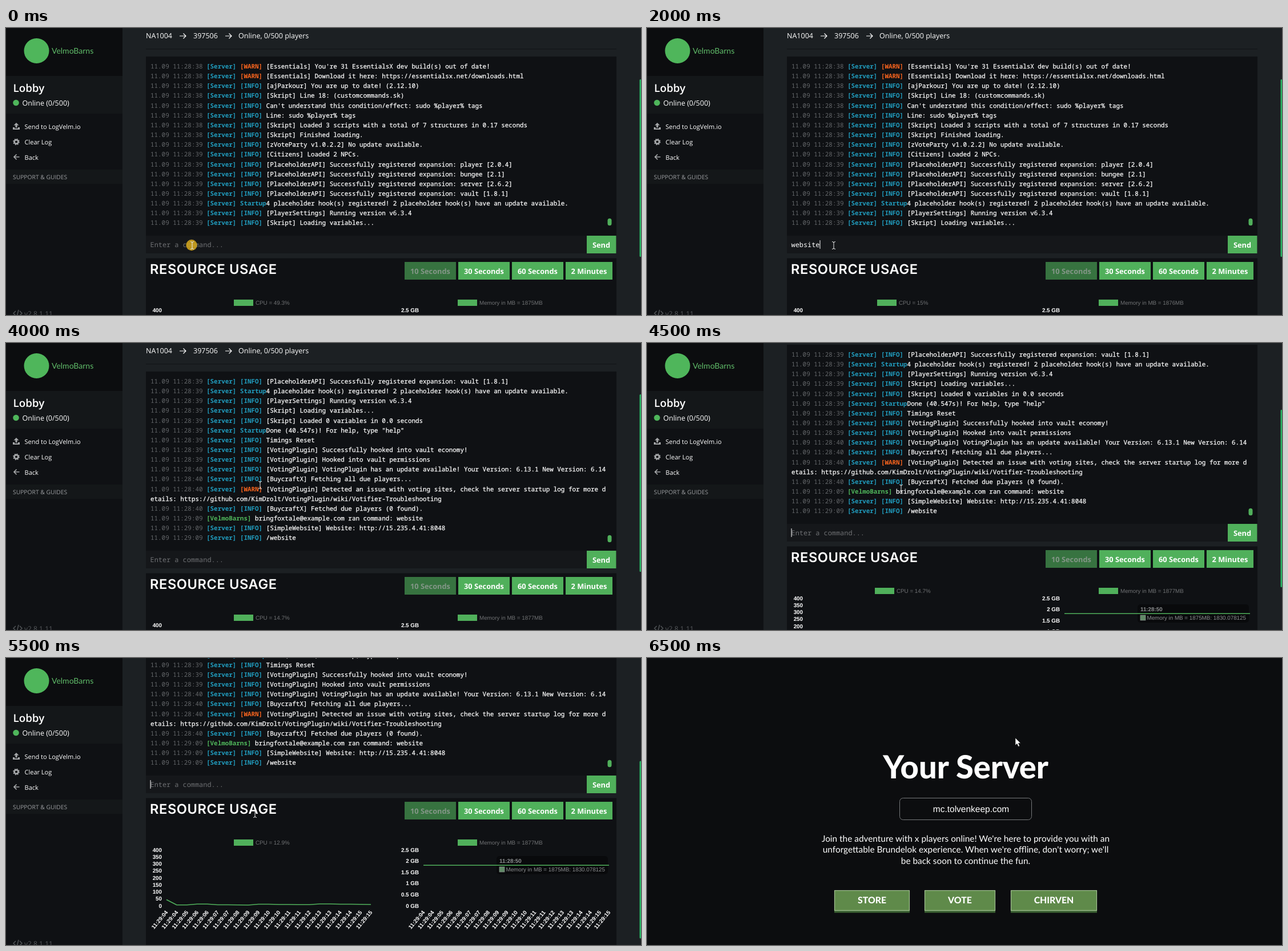
An HTML page that plays this animation: 1112x503 px, repeating every 7 s.

```html
<!DOCTYPE html>
<html lang="en">
<head>
<meta charset="utf-8">
<title>Server console</title>
<style>
  html, body { margin: 0; width: 100%; height: 100%; overflow: hidden; background: #1c2023; }
  svg { display: block; }
  #stage { width: 100vw; height: 100vh; }
  text { font: 12.5px "Open Sans", "Noto Sans", sans-serif; fill: #fff; white-space: pre; text-rendering: geometricPrecision; }
  .log text { font: 500 10.9px "Noto Sans Mono", "DejaVu Sans Mono", monospace; stroke: #fff; stroke-width: .25px; }
  .log tspan { stroke: none; }
  .time { fill: #64676a; }
  .tag { fill: #219dbf; font-weight: 700; }
  .warn { fill: #f7641e; font-weight: 700; }
  .host { fill: #4fb65b; font-weight: 700; }
  .entry { font: 11.9px "Noto Sans Mono", "DejaVu Sans Mono", monospace; }
  .button { font-size: 12.8px; font-weight: 700; text-anchor: middle; }
  .menu { font-size: 11px; font-weight: 500; }
  .heading { font: 600 23.6px Inter, sans-serif; letter-spacing: .6px; }
  .chart text { font: 700 9.8px "Liberation Sans", Arial, sans-serif; }
  .chart .legend { font-weight: 400; fill: #707274; }
  .chart .tip { fill: #8e9092; }
  .chart .plain { font-weight: 400; }
  .end { text-anchor: end; }
  .site text { font-family: Lato, sans-serif; text-anchor: middle; }
</style>
</head>
<body>
<svg id="stage" viewBox="0 0 1112 503"></svg>
<script>
const GREEN = '#50b05b';
const LOOP = 7000;
const ROW = 17.15;

const escapeText = s => String(s).replace(/&/g, '&amp;').replace(/</g, '&lt;');
const text = (x, y, s, attrs = '') => `<text x="${x}" y="${y}" ${attrs}>${escapeText(s)}</text>`;
const rect = (x, y, w, h, fill, attrs = '') =>
  `<rect x="${x}" y="${y}" width="${w}" height="${h}" fill="${fill}" ${attrs}/>`;
const line = (d, color, width = 1, attrs = '') =>
  `<path d="${d}" fill="none" stroke="${color}" stroke-width="${width}" ${attrs}/>`;
const range = n => [...Array(n).keys()];

// Each entry: seconds | tag | message. An empty tag marks a wrapped line.
const LOG = `28:38|[WARN]|[Essentials] You're 31 EssentialsX dev build(s) out of date!
28:38|[WARN]|[Essentials] Download it here: https://essentialsx.net/downloads.html
28:38|[INFO]|[ajParkour] You are up to date! (2.12.10)
28:38|[INFO]|[Skript] Line 18: (customcommands.sk)
28:38|[INFO]|Can't understand this condition/effect: sudo %player% tags
28:38|[INFO]|Line: sudo %player% tags
28:38|[INFO]|[Skript] Loaded 3 scripts with a total of 7 structures in 0.17 seconds
28:38|[INFO]|[Skript] Finished loading.
28:39|[INFO]|[zVoteParty v1.0.2.2] No update available.
28:39|[INFO]|[Citizens] Loaded 2 NPCs.
28:39|[INFO]|[PlaceholderAPI] Successfully registered expansion: player [2.0.4]
28:39|[INFO]|[PlaceholderAPI] Successfully registered expansion: bungee [2.1]
28:39|[INFO]|[PlaceholderAPI] Successfully registered expansion: server [2.6.2]
28:39|[INFO]|[PlaceholderAPI] Successfully registered expansion: vault [1.8.1]
28:39|Startup|4 placeholder hook(s) registered! 2 placeholder hook(s) have an update available.
28:39|[INFO]|[PlayerSettings] Running version v6.3.4
28:39|[INFO]|[Skript] Loading variables...
28:39|[INFO]|[Skript] Loaded 0 variables in 0.0 seconds
28:39|Startup|Done (40.547s)! For help, type "help"
28:39|[INFO]|Timings Reset
28:39|[INFO]|[VotingPlugin] Successfully hooked into vault economy!
28:39|[INFO]|[VotingPlugin] Hooked into vault permissions
28:40|[INFO]|[VotingPlugin] VotingPlugin has an update available! Your Version: 6.13.1 New Version: 6.14
28:40|[INFO]|[BuycraftX] Fetching all due players...
28:40|[WARN]|[VotingPlugin] Detected an issue with voting sites, check the server startup log for more d
||etails: https://github.com/KimDrolt/VotingPlugin/wiki/Votifier-Troubleshooting
28:40|[INFO]|[BuycraftX] Fetched due players (0 found).
29:09|[VelmoBarns]|bringfoxtale@example.com ran command: website
29:09|[INFO]|[SimpleWebsite] Website: http://15.235.4.41:8048
29:09|[INFO]|/website`.split('\n');

function logRow(entry, i) {
  const [time, tag, message] = entry.split('|');
  const span = (cls, s) => `<tspan class="${cls}">${s}</tspan>`;
  let prefix = '';
  if (time) {
    prefix = span('time', `11.09 11:${time} `);
    if (tag === '[VelmoBarns]') prefix += span('host', tag + ' ');
    else prefix += span('tag', '[Server] ') + span(tag === '[WARN]' ? 'warn' : 'tag', tag.padEnd(7));
  }
  return `<text x="8" y="${14 + i * ROW}">${prefix}${escapeText(message)}</text>`;
}

function consolePanel() {
  const arrow = x => line(`M${x} 14h11m-4.5-4.5l4.5 4.5l-4.5 4.5`, '#fff', 1.2);
  return text(245, 18, 'NA1004') + arrow(304) + text(328, 18, '397506') + arrow(384) +
    text(407, 18, 'Online, 0/500 players') +
    rect(245, 36, 824, 1.5, '#14171a') +
    rect(245, 50, 824, 345, '#0f1114') +
    `<svg class="log" x="245" y="57" width="824" height="294"><g id="rows">${LOG.map(logRow).join('')}</g></svg>` +
    rect(1053.5, 0, 7, 12.5, GREEN, 'id="logThumb" rx="3.5"') +
    rect(245, 364, 772, 31, '#15171a') +
    text(252.5, 384, '', 'id="entry" class="entry"') +
    rect(0, 372, 1, 15, '#fff', 'id="caret"') +
    rect(1017, 364, 51.5, 31, GREEN) + text(1042.5, 384.7, 'Send', 'class="button"');
}

function usagePanel() {
  const buttons = [['10 Seconds', 698, 90], ['30 Seconds', 792, 90], ['60 Seconds', 886, 90], ['2 Minutes', 980, 82]]
    .map(([label, x, w], i) => `<g opacity="${i ? 1 : .62}">${rect(x, 410, w, 31, GREEN)}` +
      text(x + w / 2, 430.7, label, `class="button" opacity="${i ? 1 : .7}"`) + '</g>').join('');

  const timeLabels = (left, step) => range(21).map(i => {
    const second = String(4 + Math.floor(i * .572 + .427)).padStart(2, '0');
    return text(0, 0, '11:29:' + second, `class="end" transform="translate(${left + 3 + i * step} 604) rotate(-50)"`);
  }).join('');
  const cpuAxis = range(9).map(i => text(273, 497.5 + i * 12.25, 400 - i * 50, 'class="end"')).join('');
  const memoryAxis = range(6).map(i => text(723, 497.5 + i * 19.6, 2.5 - i * .5 + ' GB', 'class="end"')).join('');

  const load = [43, 5, 5, 11, 11, 6, 6, 5, 4, 10, 10, 8, 8, 7, 7, 12, 12, 10, 10, 9, 8];
  const cpuLine = 'M' + load.map((v, i) => `${281 + i * 17.9} ${592 - v * .245}`).join('L');

  return rect(245, 403.5, 824, 300, '#0f1114') + text(252, 431, 'RESOURCE USAGE', 'class="heading"') + buttons +
    `<g class="chart"><g id="cpuLegend">${rect(0, 476, 34, 11, GREEN)}${text(38, 484.5, '', 'id="cpu" class="legend"')}</g>` +
    rect(791, 476, 34, 11, GREEN) + text(829, 484.5, '', 'id="memory" class="legend"') +
    cpuAxis + memoryAxis + timeLabels(281, 17.9) + timeLabels(731, 16.25) +
    line(cpuLine, GREEN, 1.6, 'stroke-linejoin="round"') +
    rect(859, 505, 195, 32, '#000', 'rx="5" opacity=".4"') + line('M731 521.2H1056', GREEN, 1.6) +
    text(864, 516.5, '11:28:50', 'class="tip"') + rect(864, 524, 9, 9, '#608a66', 'stroke="#8e9092" stroke-width=".7"') +
    text(875.5, 531.5, 'Memory in MB = 1875MB: 1830.078125', 'class="tip plain"') + '</g>';
}

function sidebar() {
  const gear = `<circle cx="18" cy="199.5" r="3.4" fill="none" stroke="#a5a7a9" stroke-width="2.6"/>` +
    `<circle cx="18" cy="199.5" r="5" fill="none" stroke="#a5a7a9" stroke-width="1.6" stroke-dasharray="2 1.93"/>`;
  return rect(0, 0, 204, 503, '#0f1114') + rect(0, 0, 204, 84, '#0c0d0f') + rect(0, 84, 204, 66, '#141719') +
    rect(0, 248, 204, 25, '#141719') +
    `<circle cx="53.5" cy="40" r="22" fill="#4fb65b"/>` +
    text(80, 45, 'VelmoBarns', 'style="font:14px Lato,sans-serif;fill:#5fba68"') +
    text(12.5, 111.8, 'Lobby', 'style="font-size:18.8px;font-weight:600"') +
    `<circle cx="17.5" cy="131" r="5.3" fill="#4fb65b"/>` + text(28.5, 135.8, 'Online (0/500)') +
    `<path d="M18 166l4.5 4.5h-3v4h-3v-4h-3zM12 174h3v2h6v-2h3v4h-12z" fill="#a5a7a9"/>` +
    text(32.5, 176.8, 'Send to LogVelm.io', 'class="menu"') +
    gear + text(32.5, 203.8, 'Clear Log', 'class="menu"') +
    line('M23.5 226h-9.5m4.5-4.5l-4.5 4.5l4.5 4.5', '#a5a7a9', 1.7) + text(32.5, 230.8, 'Back', 'class="menu"') +
    text(12, 264.8, 'SUPPORT & GUIDES', 'style="font-size:10.3px;fill:#9b9da0"') +
    line('M17 496l-4 4l4 4m7-8l4 4l-4 4m-2-10l-3 12', '#55585b', 1.4) +
    text(32, 504.5, 'v2.8.1.11', 'style="font-size:12px;fill:#55585b"');
}

function sitePage() {
  const button = (x, w, label) => rect(x, 443, w, 3.5, '#3c6233') +
    rect(x + .5, 407.5, w - 1, 35, '#5f8a4a', 'stroke="#a3c293" stroke-width="1.2"') +
    text(x + w / 2, 430.3, label, 'style="font-size:15.8px;font-weight:800"');
  const paragraph = [
    "Join the adventure with x players online! We're here to provide you with an",
    "unforgettable Brundelok experience. When we're offline, don't worry; we'll",
    'be back soon to continue the fun.'
  ].map((s, i) => text(558, 321.7 + i * 19.7, s, 'style="font-size:15.4px;font-weight:400"')).join('');
  return rect(0, 0, 1112, 503, '#0c0d0f') +
    text(558, 211, 'Your Server', 'style="font-size:56px;font-weight:800"') +
    rect(442.5, 245.5, 231, 38, 'none', 'rx="6" stroke="#77797b"') +
    text(567.5, 269.5, 'mc.tolvenkeep.com', 'style="font:15.5px Liberation Sans,Arial,sans-serif"') +
    paragraph + button(328, 132, 'STORE') + button(486, 124, 'VOTE') + button(637, 151, 'CHIRVEN');
}

const cursors =
  `<g id="cursor"><circle id="glow" cx="-1" cy="-.5" r="9.7" fill="#d2a51c" opacity=".88"/>` +
  line('M-3-6.5q3 0 3 2v9q0 2-3 2M3-6.5q-3 0-3 2m0 9q0 2 3 2', '#e8e8e8', 1, 'id="beam"') +
  `<path id="arrow" d="M0 0v13l3-2.8l2.2 5l2.3-1l-2.2-4.9h4z" fill="#fff" stroke="#111" stroke-width=".6"/></g>`;

const stage = document.getElementById('stage');
stage.innerHTML = `<g id="panel"><g id="page">${consolePanel()}${usagePanel()}</g>${sidebar()}` +
  rect(1109.5, 0, 3, 311, '#28b463', 'id="pageThumb" rx="1.5"') +
  `</g><g id="site" class="site">${sitePage()}</g>${cursors}`;
const part = Object.fromEntries([...stage.querySelectorAll('[id]')].map(el => [el.id, el]));

// Every step lists only what differs from the one before it.
const STEPS = [
  { at: 0, scroll: 0, firstRow: 0, logThumb: 340, entry: '', caret: false, pointer: 'glow', x: 326, y: 381,
    cpu: '49.3', memory: 1875, site: false },
  { at: 500, entry: 'we', caret: true, pointer: 'beam', x: 327, cpu: '16', memory: 1876 },
  { at: 1000, entry: 'web' },
  { at: 2000, entry: 'website', cpu: '15' },
  { at: 2500, cpu: '14.7' },
  { at: 3000, entry: '', caret: false, x: 445, y: 249, logThumb: 339, memory: 1877 },
  { at: 3500, firstRow: 11, logThumb: 341 },
  { at: 4000, firstRow: 13, logThumb: 343 },
  { at: 4500, scroll: 47, caret: true, y: 255 },
  { at: 5000, scroll: 111, x: 440, y: 264, cpu: '12.9' },
  { at: 5500, scroll: 158, x: 436, y: 273 },
  { at: 6000, scroll: 180, pointer: 'arrow', x: 645, y: 140 },
  { at: 6500, site: true }
];

const show = (el, visible) => el.setAttribute('visibility', visible ? 'visible' : 'hidden');
const move = (el, x, y) => el.setAttribute('transform', `translate(${x} ${y})`);

function draw(time) {
  const s = Object.assign({}, ...STEPS.filter(step => step.at <= time));
  show(part.panel, !s.site);
  part.site.style.display = s.site ? '' : 'none';
  move(part.page, 0, -s.scroll);
  move(part.rows, 0, -s.firstRow * ROW);
  part.pageThumb.setAttribute('y', 90 + s.scroll * .572);
  part.logThumb.setAttribute('y', s.logThumb - 6.2);
  part.entry.textContent = s.entry || 'Enter a command...';
  part.entry.style.fill = s.entry ? '#fff' : '#6e7073';
  part.caret.setAttribute('x', 252.5 + s.entry.length * 7.14);
  part.caret.style.display = s.caret ? '' : 'none';
  part.cpu.textContent = `CPU = ${s.cpu}%`;
  move(part.cpuLegend, s.cpu.length > 2 ? 399 : 403, 0);
  part.memory.textContent = `Memory in MB = ${s.memory}MB`;
  move(part.cursor, s.x, s.y);
  show(part.glow, s.pointer === 'glow');
  show(part.beam, s.pointer !== 'arrow');
  show(part.arrow, s.pointer === 'arrow');
}

function tick() {
  draw(performance.now() % LOOP);
  requestAnimationFrame(tick);
}
tick();
</script>
</body>
</html>
```
